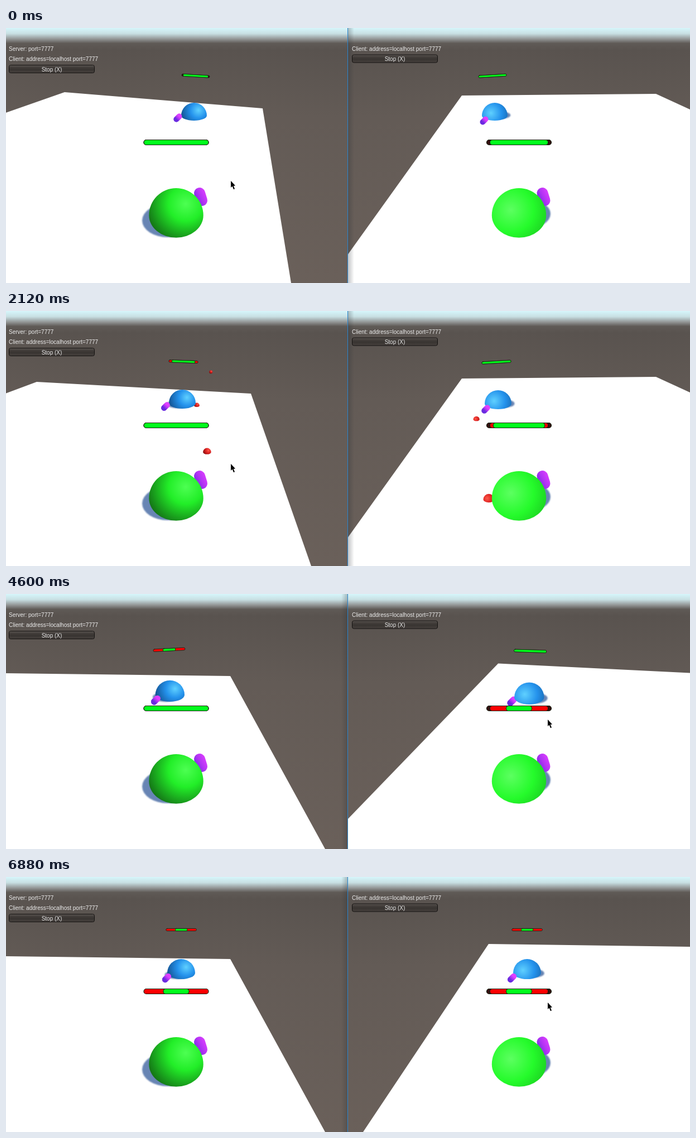
These frames come from a looping animation (1226 px wide and 457 px high, 6960 ms). An HTML page with a canvas:

```html
<!DOCTYPE html>
<html lang="en">
<head>
<meta charset="utf-8">
<title>Networked shooter, two views</title>
<style>
  html, body { margin: 0; width: 100%; height: 100%; overflow: hidden; }
  canvas { display: block; }
</style>
</head>
<body>
<canvas id="stage" width="1226" height="457"></canvas>
<script>
const ctx = document.getElementById('stage').getContext('2d');
const W = 1226, H = 457, SPLIT = 612, LOOP = 6960, HORIZON = 10;

const GREEN = ['#4dff52', '#22ee28', '#147016'];
const LIT_GREEN = ['#5cff60', '#25fb2b', '#12a818'];
const BLUE = ['#5fd0ff', '#2492ec', '#114a86'];
const RED = ['#ff5a4a', '#dd2222', '#7a0c0c'];

// Ground: time, edge x at the bottom, inner corner x y, outer corner x y
// Rival: time, x, top, radius, gun dx, gun dy, bar tilt, bar dx
const views = [
  {
    left: 0, right: SPLIT, me: 305, light: [0.35, -0.42], outer: [-200, 222], muzzle: 352, rivalGun: [279, 200],
    ground: [[0, 511, 460, 144, 105, 115], [790, 527, 420, 139, 50, 123],
             [2120, 547, 439, 148, 55, 127], [3700, 572, 402, 147, -10, 142]],
    rival: [[0, 337, 134, 23, -29, -5, 3, 3], [790, 304, 133, 22.5, -27, -4, 2, 1],
            [2120, 316, 141, 24, -30, -4, 2, 2], [3970, 284, 146, 25, -30, -4, 0, -2],
            [5060, 301, 161, 27, -22, -2, -5, -1], [5840, 332, 202, 34, -29, 2, -4, 3],
            [6880, 314, 147, 25, -26, -2, 0, 0]]
  },
  {
    left: SPLIT + 1, right: W, me: 919.5, light: [-0.3, -0.2], outer: [1400, 226], muzzle: 967, rivalGun: [857, 168],
    ground: [[4000, 576, 817, 121, 1165, 118], [5060, 549, 932, 127, 1300, 161],
             [5840, 652, 896, 146, 1300, 170], [6880, 640, 865, 120, 1300, 126]],
    rival: [[0, 876, 134, 23, -19, 0, -3, -4], [790, 876, 134, 23, -23, -1, -3, -4],
            [2120, 882, 142, 24, -22, 0, -3, -3], [3970, 884, 148, 25, -28, -1, -1, -4],
            [5060, 977, 166, 28, -33, -9, 4, 6], [5840, 968, 205, 34, -39, -5, 4, 8],
            [6880, 934, 147, 25, -27, -2, 0, 0]]
  }
];

// Shots: time, shooter, vanishing x, drift seen by the rival, life (long = miss)
const shots = [
  [590, 0, 407, -0.55, 1400], [860, 0, 375, -0.5, 1400], [1300, 0, 330, 0.05, 550],
  [1600, 0, 330, 0.05, 550], [2020, 0, 402, -0.55, 1400], [2450, 0, 280, 0.1, 550],
  [2750, 0, 270, 0.1, 550], [3050, 0, 265, 0.1, 550],
  [4790, 1, 1177, -0.56, 900], [4910, 1, 1010, 0.16, 350], [5010, 1, 1083, -0.1, 350],
  [5110, 1, 1058, -0.3, 900], [5250, 1, 1000, 0.1, 350], [5400, 1, 1000, 0.1, 350],
  [5900, 1, 975, 0.15, 350], [6150, 1, 960, 0.15, 350]
];

function sample(keys, t) {
  const i = keys.findIndex(k => k[0] > t);
  if (i === 0) return keys[0].slice(1);
  if (i < 0) return keys[keys.length - 1].slice(1);
  const a = keys[i - 1], b = keys[i], p = (t - a[0]) / (b[0] - a[0]);
  return a.slice(1).map((v, n) => v + (b[n + 1] - v) * p);
}

function health(player, t) {
  const hits = shots.filter(s => s[1] !== player && s[4] < 900 && t >= s[0] + s[4]).length;
  return (player ? 0.9 : 1) - hits * 0.1;
}

function vertical(y0, y1, stops) {
  const g = ctx.createLinearGradient(0, y0, 0, y1);
  stops.forEach(([at, color]) => g.addColorStop(at, color));
  return g;
}

function dome(x, top, r, ry, colors, [lx, ly]) {
  const y = top + r, cx = x + lx * r, cy = y + ly * r;
  const g = ctx.createRadialGradient(cx, cy, 0, cx, cy, r * (lx > 0 ? 1.5 : 2));
  colors.forEach((c, i) => g.addColorStop([0, 0.42, 1][i], c));
  ctx.fillStyle = g;
  ctx.beginPath();
  ctx.arc(x, y, r, Math.PI, 0);
  ctx.ellipse(x, y, r, ry, 0, 0, Math.PI);
  ctx.fill();
}

function shadow(x, y, rx, ry) {
  ctx.save();
  ctx.filter = 'blur(1px)';
  ctx.fillStyle = '#6885b4';
  ctx.beginPath();
  ctx.ellipse(x, y, rx, ry, 0, 0, 7);
  ctx.fill();
  ctx.restore();
}

function gun(x0, y0, x1, y1, width) {
  const g = ctx.createLinearGradient(x0 - width / 2, y1, x1 + width / 2, y0);
  g.addColorStop(0, '#6a2be0');
  g.addColorStop(0.5, '#b233f4');
  g.addColorStop(1, '#e040ff');
  ctx.strokeStyle = g;
  ctx.lineWidth = width;
  ctx.lineCap = 'round';
  ctx.beginPath();
  ctx.moveTo(x0, y0);
  ctx.lineTo(x1, y1);
  ctx.stroke();
}

function pill(w, h, color, line) {
  ctx.beginPath();
  ctx.roundRect(-w / 2, -h / 2, w, h, h / 2);
  ctx.fillStyle = color;
  ctx.fill();
  ctx.strokeStyle = '#152010';
  ctx.lineWidth = line;
  ctx.stroke();
}

function bar(x, y, w, h, hp, tilt, reach) {
  const line = h > 6 ? 1.2 : 0.8;
  ctx.save();
  ctx.translate(x, y);
  ctx.rotate(Math.atan2(tilt, w));
  pill(w, h, reach < 1 ? '#35100f' : '#ff0000', line);
  if (reach < 1 && hp < reach - 0.01) pill(w * reach, h, '#ff0000', line);
  pill(w * hp, h, '#00ff1c', line);
  ctx.restore();
}

function bulletsIn(side, t) {
  const v = views[side], list = [];
  for (const [start, shooter, vanish, drift, life] of shots) {
    const age = (t - start) / 1000;
    if (age < 0 || age * 1000 >= life) continue;
    const own = shooter === side;
    const depth = own ? 1.05 + 1.5 * age : (side ? 1.75 : 1.46) - 1.65 * age;
    if (depth < 0.5) continue;
    const y = HORIZON + 290 / depth, [gx, gy] = v.rivalGun;
    const x = own ? vanish + (v.muzzle - vanish) / depth : gx + drift * (y - gy);
    list.push({ x, y, depth, r: 8.8 / depth });
  }
  return list.sort((a, b) => b.depth - a.depth);
}

function drawView(side, t) {
  const { left, right, me, light, ground, outer, rival } = views[side];
  ctx.save();
  ctx.beginPath();
  ctx.rect(left, 0, right - left, H);
  ctx.clip();
  ctx.fillStyle = vertical(0, H, [[0, '#d6f6fb'], [0.022, '#c8e0e3'], [0.042, '#969a9a'],
    [0.06, '#5f5a56'], [0.085, '#59534f'], [0.35, '#635b56'], [1, '#6a605a']]);
  ctx.fillRect(left, 0, right - left, H);

  const [edge, ax, ay, bx, by] = sample(ground, t);
  ctx.fillStyle = '#fff';
  ctx.beginPath();
  [[edge, H], [ax, ay], [bx, by], outer, [outer[0], H]].forEach(p => ctx.lineTo(...p));
  ctx.fill();

  const [x, top, r, gdx, gdy, tilt, bdx] = sample(rival, t);
  const ry = r - 14, bottom = top + r + ry;
  const rivalDepth = 290 / (bottom - 6 - HORIZON);
  const bullets = bulletsIn(side, t);
  const drawBullet = b => dome(b.x, b.y - b.r * 0.8, b.r, b.r * (b.y < 146 ? 1 : 0.55), RED, light);

  bullets.filter(b => b.depth > rivalDepth).forEach(drawBullet);
  if (side) shadow(x + r * 0.4, bottom - r * 0.42, r * 0.83, ry * 0.75);
  else if (t > 300) shadow(x - r * 0.3, bottom - r * 0.32, r * 0.88, ry * 0.7);
  const gx = x + gdx, gy = bottom + gdy, k = r * 0.11;
  const drawGun = () => gun(gx + k, gy - k, gx - k, gy + k, r * 0.43);
  if (gdy < -5 || !side) drawGun();
  dome(x, top, r, ry, BLUE, light);
  if (gdy >= -5) drawGun();
  bullets.filter(b => b.depth <= rivalDepth).forEach(drawBullet);
  bar(x + bdx, top - 2.1 * r, 2.18 * r, r * 0.17, health(1 - side, t), tilt, !side && t < 400 ? 0.9 : 1);

  if (side) shadow(935, 333, 41, 26);
  else shadow(290, 345, 46, 30);
  gun(me + 42, 296, me + 46, 309, 20);
  dome(me, 287, 48.7, 40, side ? LIT_GREEN : GREEN, light);
  bar(me, 205, 116, 9, health(side, t), 0, side ? 0.9 : 1);
  ctx.restore();
}

function label(text, x, y, align = 'left') {
  ctx.font = '10px "Liberation Sans", Arial, sans-serif';
  ctx.textAlign = align;
  ctx.fillStyle = '#ececec';
  ctx.fillText(text, x, y);
}

function button(x, y) {
  ctx.beginPath();
  ctx.roundRect(x + 0.5, y + 0.5, 153, 14, 3);
  ctx.fillStyle = vertical(y, y + 15, [[0, '#625c58'], [0.25, '#45403d'], [0.55, '#383431'], [1, '#48423f']]);
  ctx.fill();
  ctx.strokeStyle = '#131110';
  ctx.lineWidth = 1;
  ctx.stroke();
  label('Stop (X)', x + 77, y + 11.5, 'center');
}

function divider(t) {
  const dir = t < 4300 ? 1 : -1, from = dir > 0 ? SPLIT + 1 : SPLIT;
  const g = ctx.createLinearGradient(from, 0, from + dir * 11, 0);
  g.addColorStop(0, 'rgba(40,45,50,.28)');
  g.addColorStop(1, 'rgba(40,45,50,0)');
  ctx.fillStyle = g;
  ctx.fillRect(from, 0, dir * 11, H);
  ctx.fillStyle = '#2a86d0';
  ctx.fillRect(SPLIT, 0, 1, H);
}

function cursor(t) {
  const [x, y] = sample([[3700, 403, 274], [3950, 971, 225]], t);
  ctx.save();
  ctx.translate(x, y);
  ctx.beginPath();
  [[0, 0], [0, 12], [2.6, 9.6], [5, 15.2], [7, 14.3], [4.7, 9], [8, 8.6]].forEach(p => ctx.lineTo(...p));
  ctx.closePath();
  ctx.strokeStyle = 'rgba(255,255,255,.6)';
  ctx.lineWidth = 1;
  ctx.stroke();
  ctx.fillStyle = '#000';
  ctx.fill();
  ctx.restore();
}

function draw() {
  const t = performance.now() % LOOP;
  drawView(0, t);
  drawView(1, t);
  divider(t);
  label('Server: port=7777', 5, 41);
  label('Client: address=localhost port=7777', 5, 59);
  button(5, 66);
  label('Client: address=localhost port=7777', 620, 41);
  button(620, 47.5);
  cursor(t);
  requestAnimationFrame(draw);
}
draw();
</script>
</body>
</html>
```
